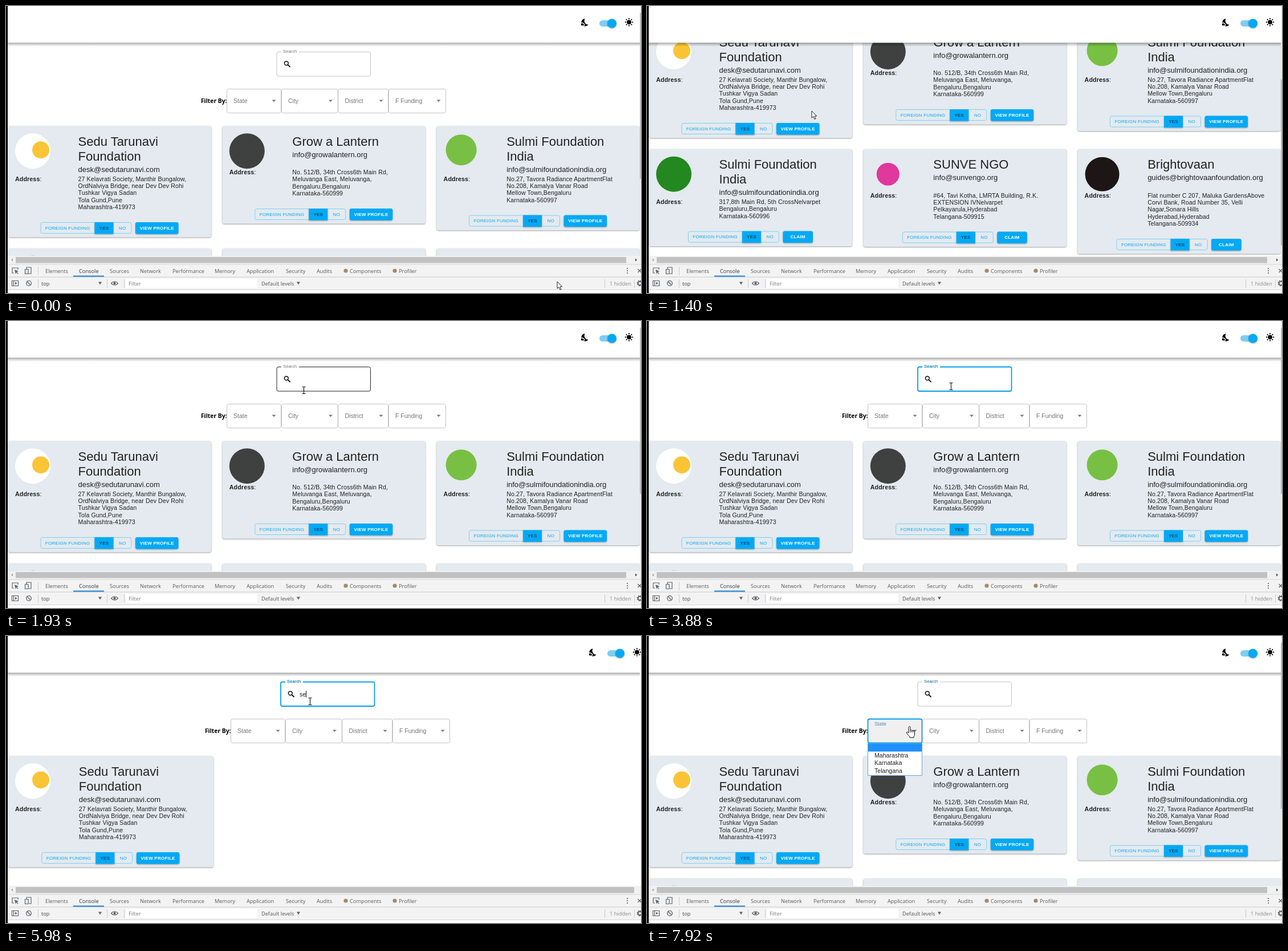
Write an HTML page that moves like this. It is 1114 by 503 pixels and loops after 8000 ms.

```html
<!DOCTYPE html>
<html lang="en">
<head>
<meta charset="utf-8">
<title>Directory search</title>
<style>
html, body { margin: 0; width: 100%; height: 100%; overflow: hidden; background: #fff; }
svg { display: block; width: 1114px; height: 503px; }
text { font-family: "Liberation Sans", Arial, sans-serif; white-space: pre; }
.dev text { font-family: "Open Sans", "Noto Sans", sans-serif; }
.card { filter: drop-shadow(0 1px 1px rgba(0,0,0,.38)); }
.raised { filter: drop-shadow(0 1px 1px rgba(0,0,0,.35)); }
</style>
</head>
<body>
<svg id="stage" viewBox="0 0 1114 503"></svg>
<script>
const BLUE = '#03a9f4', FOCUS = '#03a0e6', INK = '#222', GREY = '#757575', LINE = '#c4c4c4';
const LOOP = 8000;

// Markup helpers
const attrs = o => Object.entries(o).map(([k, v]) => ` ${k}="${v}"`).join('');
const text = (x, mid, size, str, o = {}) =>
  `<text x="${x}" y="${mid + size * 0.36}" font-size="${size}"${attrs({ fill: INK, ...o })}>${str}</text>`;
const rect = (x, y, width, height, o = {}) => `<rect${attrs({ x, y, width, height, ...o })}/>`;
const circle = (cx, cy, r, o = {}) => `<circle${attrs({ cx, cy, r, ...o })}/>`;
const path = (d, o = {}) => `<path${attrs({ d, ...o })}/>`;
const group = (o, ...kids) => `<g${attrs(o)}>${kids.join('')}</g>`;
const outline = (stroke, w = 1) => ({ fill: 'none', stroke, 'stroke-width': w });

const cards = [
  { title: ['Sedu Tarunavi', 'Foundation'], mail: 'desk@sedutarunavi.com', claim: false,
    lines: ['27 Kelavrati Society, Manthir Bungalow,', 'OrdNalviya Bridge, near Dev Dev Rohi', 'Tushkar Vigya Sadan', 'Tola Gund,Pune', 'Maharashtra-419973'],
    mark: circle(47, 44, 31, { fill: '#fff' }) + circle(61, 42, 15, { fill: '#fac436' }) },
  { title: ['Grow a Lantern'], mail: 'info@growalantern.org', claim: false,
    lines: ['No. 512/B, 34th Cross6th Main Rd,', 'Meluvanga East, Meluvanga,', 'Bengaluru,Bengaluru', 'Karnataka-560999'],
    mark: circle(47, 44, 31, { fill: '#3f4140' }) },
  { title: ['Sulmi Foundation', 'India'], mail: 'info@sulmifoundationindia.org', claim: false,
    lines: ['No.27, Tavora Radiance ApartmentFlat', 'No.208, Kamalya Vanar Road', 'Mellow Town,Bengaluru', 'Karnataka-560997'],
    mark: circle(47, 42, 27, { fill: '#78c043' }) },
  { title: ['Sulmi Foundation', 'India'], mail: 'info@sulmifoundationindia.org', claim: true,
    lines: ['317,8th Main Rd, 5th CrossNelvarpet', 'Bengaluru,Bengaluru', 'Karnataka-560996'],
    mark: circle(47, 44, 31, { fill: '#22881f' }) },
  { title: ['SUNVE NGO'], mail: 'info@sunvengo.org', claim: true,
    lines: ['#64, Tavi Kotha, LMRTA Building, R.K.', 'EXTENSION IVNelvarpet', 'Pelkayarula,Hyderabad', 'Telangana-509915'],
    mark: circle(47, 44, 20, { fill: '#e0389c' }) },
  { title: ['Brightovaan'], mail: 'guides@brightovaanfoundation.org', claim: true,
    lines: ['Flat number C 207, Maluka GardensAbove', 'Corvi Bank, Road Number 35, Velli', 'Nagar,Sonara Hills', 'Hyderabad,Hyderabad', 'Telangana-509934'],
    mark: circle(47, 44, 30, { fill: '#1d1516' }) },
];

function buttons(mid, y, claim) {
  const w = claim ? 52.5 : 75.5, x = mid - (166.5 + w) / 2, top = y - 10;
  const label = (cx, str, fill, weight = 400) =>
    text(cx, y, 8, str, { fill, 'font-weight': weight, 'text-anchor': 'middle', 'letter-spacing': 0.23 });
  return rect(x + 0.5, top + 0.5, 159, 19, { rx: 3, ...outline('#7fcef4') }) +
    rect(x + 95, top, 33, 20.5, { fill: BLUE, class: 'raised' }) +
    rect(x + 166.5, top, w, 20.5, { rx: 3, fill: BLUE, class: 'raised' }) +
    label(x + 47.7, 'FOREIGN FUNDING', BLUE) + label(x + 111.5, 'YES', '#10222c') + label(x + 143.7, 'NO', BLUE) +
    label(x + 166.5 + w / 2, claim ? 'CLAIM' : 'VIEW PROFILE', '#fff', 700);
}

function card(c, x, y, w) {
  const two = c.title.length > 1, tx = w * 0.346, ay = two ? 92.5 : 81;
  const by = ay + (c.lines.length - 1) * 12.4 + 36.6;
  const small = { 'letter-spacing': 0.1 };
  return group({ transform: `translate(${x} ${y})` },
    rect(0.5, 0, w, by + 16.4, { rx: 4, fill: '#e4eaef', class: 'card' }),
    group({ transform: 'translate(-3.2 0)' }, c.mark),
    c.title.map((s, i) => text(tx, 26.4 + i * 26.3, 22, s)).join(''),
    text(tx, two ? 76 : 49.8, 13, c.mail),
    text(12.8, ay, 10.7, '<tspan font-weight="700">Address</tspan>:', small),
    c.lines.map((s, i) => text(tx, ay + i * 12.4, 10.6, s, small)).join(''),
    buttons(w / 2, by, c.claim));
}

const view = (id, list, w) => group({ id }, ...list.map((n, i) =>
  card(cards[n], 3.2 + (i % 3) * 375.8, i < 3 ? 210.2 : 424.7, w)));

// Search and filter row
const caretDown = x => path(`M${x - 3.5} 164.5h7l-3.5 3.5z`, { fill: GREY });
const selects = [['State', 387, 96], ['City', 483, 99.5], ['District', 582.5, 88.5], ['F Funding', 671, 101]];
const filters = group({ id: 'form' },
  rect(475, 80.5, 164.5, 42.5, { id: 'box', rx: 3, ...outline(LINE) }),
  rect(483, 78, 31, 5, { fill: '#fff' }),
  text(486, 79.7, 7.7, 'Search', { fill: GREY }),
  text(486, 79.7, 7.7, 'Search', { id: 'blueLabel', fill: FOCUS }),
  circle(491.8, 100.3, 3.4, outline('#111', 1.5)), path('M494.3 102.8l4.2 4.2', outline('#111', 1.8)),
  text(508, 102, 10.6, '', { id: 'query' }),
  rect(508, 96, 1, 12, { id: 'caret', fill: '#111' }),
  text(387.5, 166.3, 10.3, 'Filter By:', { fill: '#000', 'font-weight': 700, 'text-anchor': 'end', style: "font-family:'Open Sans','Noto Sans',sans-serif" }),
  ...selects.map(([s, x, w], i) => rect(x + 0.5, 145.5, w - 1, 42, { rx: 3, ...outline(LINE), ...(i ? {} : { id: 'state' }) }) +
    text(x + 12, 166.5, 10.5, s, { fill: GREY, ...(i ? {} : { id: 'stateLabel' }) }) + caretDown(x + w - 13)));

const menu = group({ id: 'menu' },
  rect(387.5, 188.5, 95, 56, { fill: '#fff', stroke: '#6d9fd8' }),
  rect(388, 189, 94, 13.5, { fill: '#1e90ff' }),
  ...['Maharashtra', 'Karnataka', 'Telangana'].map((s, i) => text(399, 209 + i * 13.6, 10.6, s)));

const ray = a => path('M0-5v-2.2', { transform: `rotate(${a})`, ...outline('#000', 1.7) });
const header = rect(3, 64, 1109, 7, { fill: 'url(#shade)' }) + rect(3, 0, 1111, 64.5, { fill: '#fff' }) +
  group({ id: 'tools' },
    group({ transform: 'translate(1008 21) scale(.66)' },
      path('M11.1 12.1C8.8 7.6 10.6 3.6 11.6 2 6.3 2.2 2 6.6 2 12.4c.6-.3 1.3-.4 2-.4 1.7 0 3.2.8 4.1 2.1 1.7.5 2.9 2 2.9 3.9 0 1.5-.9 2.8-2.1 3.5 1 .3 2 .5 3.1.5 3.5 0 6.6-1.8 8.4-4.5-2.4.2-7-1-9.3-5.4z'),
      path('M7 16h-.2C6.4 14.8 5.3 14 4 14a3 3 0 0 0 0 6h3a2 2 0 0 0 0-4z')),
    rect(1041, 25, 30, 11, { rx: 5.5, fill: '#7fcdf3' }), circle(1063, 30.5, 8, { fill: BLUE, class: 'raised' }),
    group({ transform: 'translate(1093 28.3)' }, circle(0, 0, 3.9), ...[0, 45, 90, 135, 180, 225, 270, 315].map(ray)));

// Developer panel
const tabs = [['Elements', 69], ['Console', 128], ['Sources', 182], ['Network', 235], ['Performance', 292], ['Memory', 366],
  ['Application', 422], ['Security', 491], ['Audits', 545], ['Components', 603], ['Profiler', 689]];
const sep = (x, y) => rect(x, y, 1, 15, { fill: '#ccc' });
const icon = (d, w = 1.2) => path(d, outline('#5f6368', w));
const panel = group({ class: 'dev' },
  rect(3, 438, 1111, 15, { fill: '#f1f1f1' }),
  rect(17, 440, 1071, 10.5, { id: 'hThumb', fill: '#c1c1c1' }),
  path('M12 442.5v5l-3-2.5z', { fill: '#a3a3a3' }), path('M1104 442.3v5.4l3.2-2.7z', { id: 'hArrow', fill: '#505050' }),
  rect(3, 453, 1111, 44, { fill: '#f3f3f3' }), rect(3, 452.5, 1111, 1, { fill: '#d8d8d8' }),
  rect(3, 474.5, 1111, 1, { fill: '#ccc' }), rect(3, 497, 1111, 1, { fill: '#d5d5d5' }), rect(3, 498, 1111, 5, { fill: '#fff' }),
  tabs.map(([s, x]) => text(x, 464.3, 9.25, s, { fill: s === 'Console' ? '#333' : '#5a5a5a' })).join(''),
  rect(118, 472.5, 54, 2, { fill: '#1a80d9' }),
  circle(596, 464, 3.6, { fill: '#a58a68' }), circle(682, 464, 3.6, { fill: '#a58a68' }),
  icon('M14 468h-3v-9h10v3'), path('M15 462l7 3-3 1.2 2.5 2.5-1 1-2.5-2.6-1.2 3z', { fill: '#5f6368' }),
  icon('M36 461v-3h8v11h-4M33.5 461.500h5.500v8h-5.500z'), sep(56, 457),
  [460, 464, 468].map(y => circle(1090, y, 1, { fill: '#555' })).join(''), icon('M1108.500 461l6 6m0-6l-6 6', 1.3),
  icon('M10.500 481.500h11v9h-11zM13.500 481v10'), path('M16 483.500v5l3.500-2.500z', { fill: '#5f6368' }),
  circle(40, 486, 4.4, outline('#5f6368', 1.3)), icon('M37 483l6 6'), sep(56, 479),
  text(62, 486.3, 9.25, 'top', { fill: '#444' }), path('M162 483.500h6l-3 5z', { fill: '#5f6368' }), sep(177, 479),
  icon('M184.500 486q6-6.500 12 0q-6 6.500-12 0z'), circle(190.5, 486, 2.2, { fill: '#5f6368' }), sep(207, 479),
  rect(210, 478, 231, 16, { fill: '#fff' }), text(215, 486.8, 9.25, 'Filter', { fill: '#7b7b7b' }),
  text(448, 486.3, 9.2, 'Default levels', { fill: '#555' }), path('M510 483.500h6l-3 5z', { fill: '#5f6368' }),
  sep(1050, 479), text(1059, 486.3, 9.25, '1 hidden', { fill: '#8b8b8b' }), sep(1102, 479),
  circle(1112, 486, 3.3, outline('#5f6368', 2)), circle(1112, 486, 4.8, { ...outline('#5f6368', 1.4), 'stroke-dasharray': '1.9 1.9' }));

const pointers =
  path('M0 0v12.200l2.900-2.700 2 4.900 2.100-.9-2-4.700h3.700z', { id: 'arrow', fill: '#fff', stroke: '#111', 'stroke-width': 0.9 }) +
  path('M-3-6h2.200q.8 0 .8.800v10.400q0 .8-.8.800h-2.200M3-6h-2.200q-.8 0-.8.800v10.400q0 .8.800.800h2.200', { id: 'beam', ...outline('#111', 1.1) }) +
  path('M-1.500 11V1.200Q-1.500-.500 0-.500T1.500 1.200V6q1.500-1 2.700.5q1.500-.8 2.500.6q2-.7 2.300 1.400v4.500q0 2.500-1.500 4.500v1.500H.500v-1.500q-3-2.500-5.500-6.500q-.7-2 1-1.800q1.500.5 2.500 1.800zM1.500 6v4M4.200 7v3M6.700 7.500v2.500',
    { id: 'hand', fill: '#fff', stroke: '#111', 'stroke-width': 1, 'stroke-linejoin': 'round' });

document.getElementById('stage').innerHTML =
  `<defs><linearGradient id="shade" x2="0" y2="1"><stop stop-opacity=".5"/><stop offset=".3" stop-opacity=".22"/><stop offset="1" stop-opacity="0"/></linearGradient>
  <clipPath id="port"><path d="M3 0h1111v438H3z"/></clipPath></defs>` +
  rect(0, 0, 1114, 503, { fill: '#fff' }) +
  group({ 'clip-path': 'url(#port)' },
    group({ id: 'page' }, filters, view('all', [0, 1, 2, 3, 4, 5], 356.5), view('some', [0, 2, 3, 4], 356.5), view('one', [0], 360.3), menu),
    header,
    group({ id: 'vBar' }, rect(1112, 0, 2, 438, { fill: '#f1f1f1' }), rect(1112, 12, 2, 291, { id: 'vThumb', fill: '#c1c1c1' }))) +
  panel + rect(0, 0, 3, 503, { fill: '#000' }) + group({ id: 'pointer' }, pointers);

const $ = id => document.getElementById(id);
const set = (id, o) => { for (const k in o) $(id).setAttribute(k, o[k]); };
const show = (id, on) => { $(id).style.display = on ? '' : 'none'; };

// Bursts of movement: first step, last step, count
const bursts = [[70, 850, 11], [920, 1020, 2], [1400, 1400, 1], [1490, 1930, 7], [2030, 2180, 3], [2250, 2330, 2], [7540, 7920, 6]];
function snap(t) {
  let s = 0;
  for (const [a, b, n] of bursts) {
    if (t < a) break;
    const d = (b - a) / (n - 1) || 1;
    s = a + Math.min(n - 1, Math.floor((t - a) / d + 1e-6)) * d;
  }
  return s;
}

function track(keys, t) {
  const i = keys.findIndex(k => k[0] > t);
  if (i < 0) return keys[keys.length - 1].slice(1);
  if (i === 0) return keys[0].slice(1);
  const a = keys[i - 1], b = keys[i], p = (t - a[0]) / (b[0] - a[0]), e = p * p * (3 - 2 * p);
  return a.slice(1).map((v, j) => v + (b[j + 1] - v) * e);
}

const scrollKeys = [[640, 0], [850, 100], [1020, 200], [1330, 200], [1400, 174], [1640, 0]];
const pointerKeys = [[0, 967, 483], [620, 289, 184], [1563, 289, 184], [1930, 522.5, 121.5], [2180, 533.5, 114.5], [7464, 533.5, 114.5], [7768, 460.5, 159]];
const caretOn = [[2250, 2800], [3350, 3880], [4430, 5430], [5980, 6460], [7010, 7540]];
const within = (t, a, b) => t >= a && t < b;

function draw(t) {
  const s = snap(t), [scroll] = track(scrollKeys, s), [x, y] = track(pointerKeys, s);
  const query = within(t, 4890, 6210) ? 'se' : within(t, 4430, 6680) ? 's' : '';
  const wide = query === 'se';
  const focused = within(s, 2250, 7840), picking = s >= 7840;

  show('all', !query); show('some', query === 's'); show('one', wide);
  set('page', { transform: `translate(0 ${-scroll})` });
  set('form', { transform: `translate(${wide ? 7 : 0} 0)` });
  set('tools', { transform: `translate(${wide ? 14 : 0} 0)` });
  set('hThumb', { width: wide ? 1085 : 1071 });
  show('hArrow', !wide); show('vBar', !wide);
  set('vThumb', { y: 12 + scroll * 0.67 });

  const overSearch = scroll < 1 && within(x, 475, 648) && within(y, 80, 124);
  const overState = within(x, 387, 483) && within(y, 145, 189);
  set('box', { stroke: focused ? FOCUS : overSearch ? INK : LINE, 'stroke-width': focused ? 1.8 : 1 });
  set('blueLabel', { opacity: s < 2250 ? 0 : s < 2330 ? 0.5 : s < 7900 ? 1 : 0.6 });
  $('query').textContent = query;
  set('caret', { x: 508 + [0, 5, 11][query.length] });
  show('caret', caretOn.some(([a, b]) => within(t, a, b)));

  const p = picking ? (s - 7790) / 200 : 0;
  set('state', { stroke: picking ? FOCUS : overState ? INK : LINE, 'stroke-width': picking ? 1.8 : 1, fill: picking ? '#f0f0f0' : 'none' });
  set('stateLabel', { y: 170.3 - 14 * p * 1.0 - 6 * p, 'font-size': 10.5 - 2.6 * p, fill: picking ? '#3f8fbd' : GREY });
  show('menu', picking);

  set('pointer', { transform: `translate(${x} ${y})` });
  show('beam', overSearch); show('hand', overState); show('arrow', !overSearch && !overState);
}

const start = performance.now();
function tick() {
  draw((performance.now() - start) % LOOP);
  requestAnimationFrame(tick);
}
tick();
</script>
</body>
</html>
```
